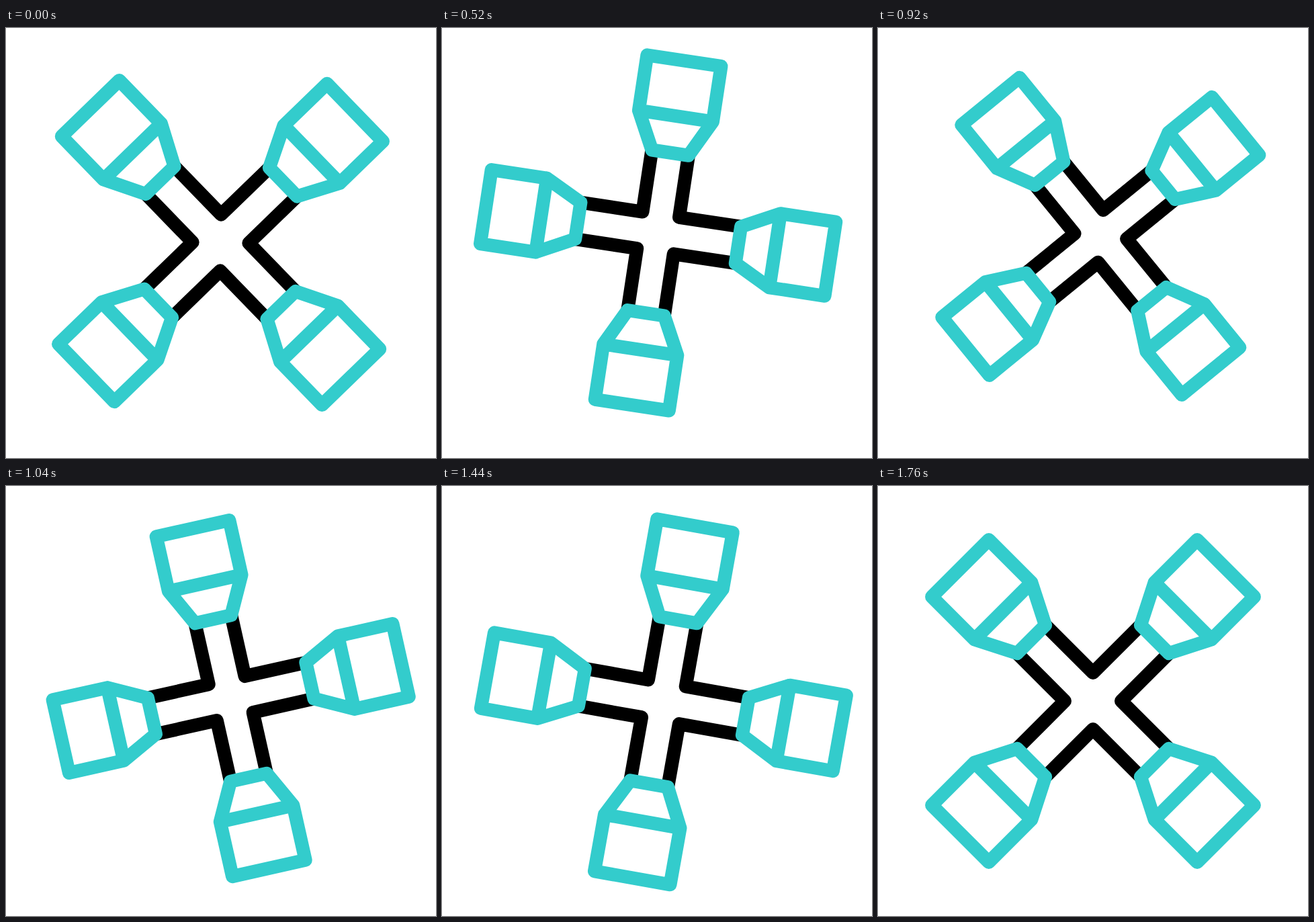
These frames come from a looping animation (640 px wide and 640 px high, 1.88 s). An HTML page:

```html
<!DOCTYPE html>
<html lang="en">
<head>
<meta charset="utf-8">
<title>Wheel wrench</title>
<style>
  html, body { margin: 0; width: 100%; height: 100%; overflow: hidden; background: #fff; }
  svg { display: block; width: 100%; height: 100%; }
  path { fill: none; stroke-linejoin: round; }
  .bar { stroke: #000; }
  .head { stroke: #3cc; stroke-linecap: round; }
</style>
</head>
<body>
<svg viewBox="0 0 640 640">
  <defs>
    <path id="bar" class="bar" d="M-29.7-130V-29.7H-130"/>
    <path id="head" class="head" d="M-60-279.3H60V-189.5L29.7-130H-29.7L-60-189.5ZM-60-189.5H60"/>
  </defs>
  <g id="wrench">
    <use href="#bar" transform="rotate(45)"/>
    <use href="#bar" transform="rotate(135)"/>
    <use href="#bar" transform="rotate(225)"/>
    <use href="#bar" transform="rotate(315)"/>
    <use href="#head" transform="rotate(45)"/>
    <use href="#head" transform="rotate(135)"/>
    <use href="#head" transform="rotate(225)"/>
    <use href="#head" transform="rotate(315)"/>
  </g>
</svg>
<script>
  const LOOP = 1880, STEP = 40, LINE = 20;
  const wrench = document.getElementById('wrench');

  // Turns run one after another; out is the x of the second easing handle.
  // shrink: how far the wrench is drawn back at the start and end of the turn.
  const turns = [
    { start: -42,  end: 300,  turn: 19,   out: 0.5, shrink: [0, 1] },
    { start: 404,  end: 632,  turn: 56,   out: 0.5, shrink: [1, 1] },
    { start: 800,  end: 1115, turn: 51.7, out: 0.5, shrink: [1, 1] },
    { start: 1256, end: 1745, turn: 53.3, out: 0.6, shrink: [1, 0] }
  ];

  // cubic-bezier(1/3, 0, out, 1)
  function ease(x, out) {
    if (x <= 0) return 0;
    if (x >= 1) return 1;
    let lo = 0, hi = 1, s;
    for (let i = 0; i < 24; i++) {
      s = (lo + hi) / 2;
      const bx = (1 - s) ** 2 * s + 3 * (1 - s) * s * s * out + s ** 3;
      if (bx < x) lo = s; else hi = s;
    }
    return s * s * (3 - 2 * s);
  }

  function draw(time) {
    const t = Math.floor(time % LOOP / STEP) * STEP;
    let angle = 0, shrink = 0;
    for (const { start, end, turn, out, shrink: [from, to] } of turns) {
      const p = ease((t - start) / (end - start), out);
      angle += turn * p;
      shrink += (to - from) * p;
    }
    const scale = 1 - 0.072 * shrink;
    wrench.setAttribute('transform',
      `translate(320 320) rotate(${angle}) ` +
      `translate(${-11.2 * shrink} ${-10.25 * shrink}) scale(${scale})`);
    // Line weight stays the same while the shape shrinks.
    wrench.setAttribute('stroke-width', LINE / scale);
  }

  const begin = performance.now();
  function tick() {
    draw(performance.now() - begin);
    requestAnimationFrame(tick);
  }
  tick();
</script>
</body>
</html>
```
